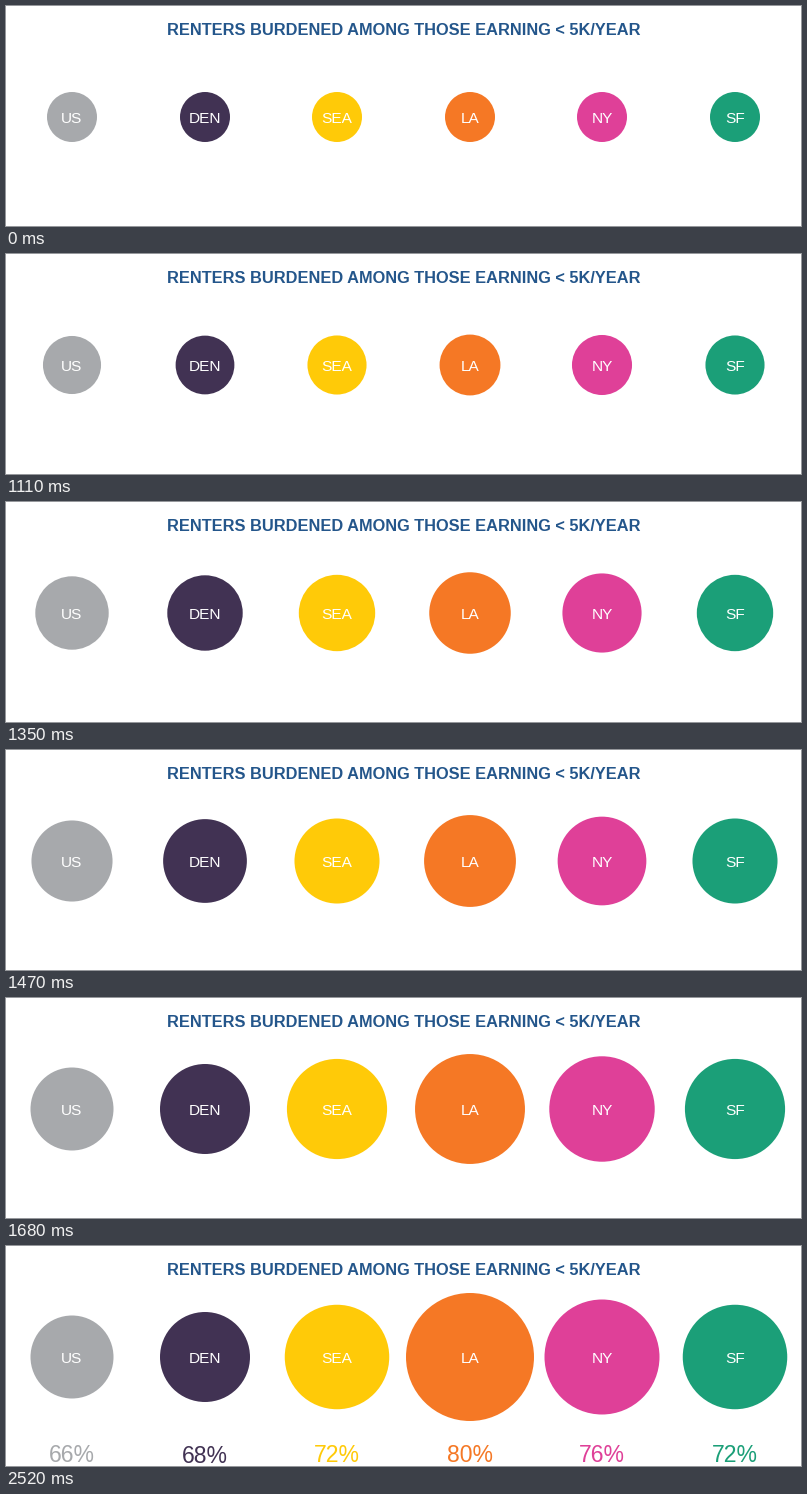
Recreate the animation shown at these times as a matplotlib script. Size 795 by 220 pixels, loop 3.55 s.

```python
import matplotlib.pyplot as plt
from matplotlib.animation import FuncAnimation
from matplotlib.patches import Circle

W, H, DPI = 795, 220, 100
LOOP, TICK = 3550, 10
GROW_AT, STEP, SHOW_AT = 990, 30, 2520
SMALL, MID_Y = 50, 111
PX = 72 / DPI

# label, colour, share, final diameter, steps of growth
CITIES = [
    ("US", "#a7a9ac", "66%", 83, 17),
    ("DEN", "#413253", "68%", 90, 19),
    ("SEA", "#ffca08", "72%", 104.5, 25),
    ("LA", "#f57825", "80%", 128, 30),
    ("NY", "#df4098", "76%", 115, 27),
    ("SF", "#1b9f78", "72%", 104.5, 25),
]

plt.rcParams["font.family"] = "Liberation Sans"
fig = plt.figure(figsize=(W / DPI, H / DPI), dpi=DPI, facecolor="white")
ax = fig.add_axes([0, 0, 1, 1])
ax.set_xlim(0, W)
ax.set_ylim(H, 0)
ax.axis("off")


def write(x, y, text, size, color, weight="normal"):
    return ax.text(x, y, text, fontsize=size * PX, color=color, weight=weight,
                   ha="center", va="baseline", zorder=3)


write(398, 29, "RENTERS BURDENED AMONG THOSE EARNING < 5K/YEAR",
      16.4, "#24568b", "bold")

bubbles, shares = [], []
for i, (label, color, share, _, _) in enumerate(CITIES):
    x = round(66 + 132.6 * i)
    bubbles.append(ax.add_patch(Circle((x, MID_Y), SMALL / 2, fc=color, lw=0)))
    write(x, 117, label, 15.4, "white")
    baseline = 217 if label == "DEN" else 216
    shares.append(write(x, baseline, share, 23, color))


def diameter(t, final, steps):
    if t < GROW_AT:
        return SMALL
    step = (t - GROW_AT) // STEP
    return SMALL + (final - SMALL) * min(1, (step + 0.2) / (steps + 0.2))


def draw(frame):
    t = frame * TICK
    for bubble, share, city in zip(bubbles, shares, CITIES):
        bubble.set_radius(diameter(t, *city[3:]) / 2)
        share.set_visible(t >= SHOW_AT)
    return bubbles + shares


anim = FuncAnimation(fig, draw, frames=LOOP // TICK, interval=TICK,
                     repeat=True, repeat_delay=0)
plt.show()
```
